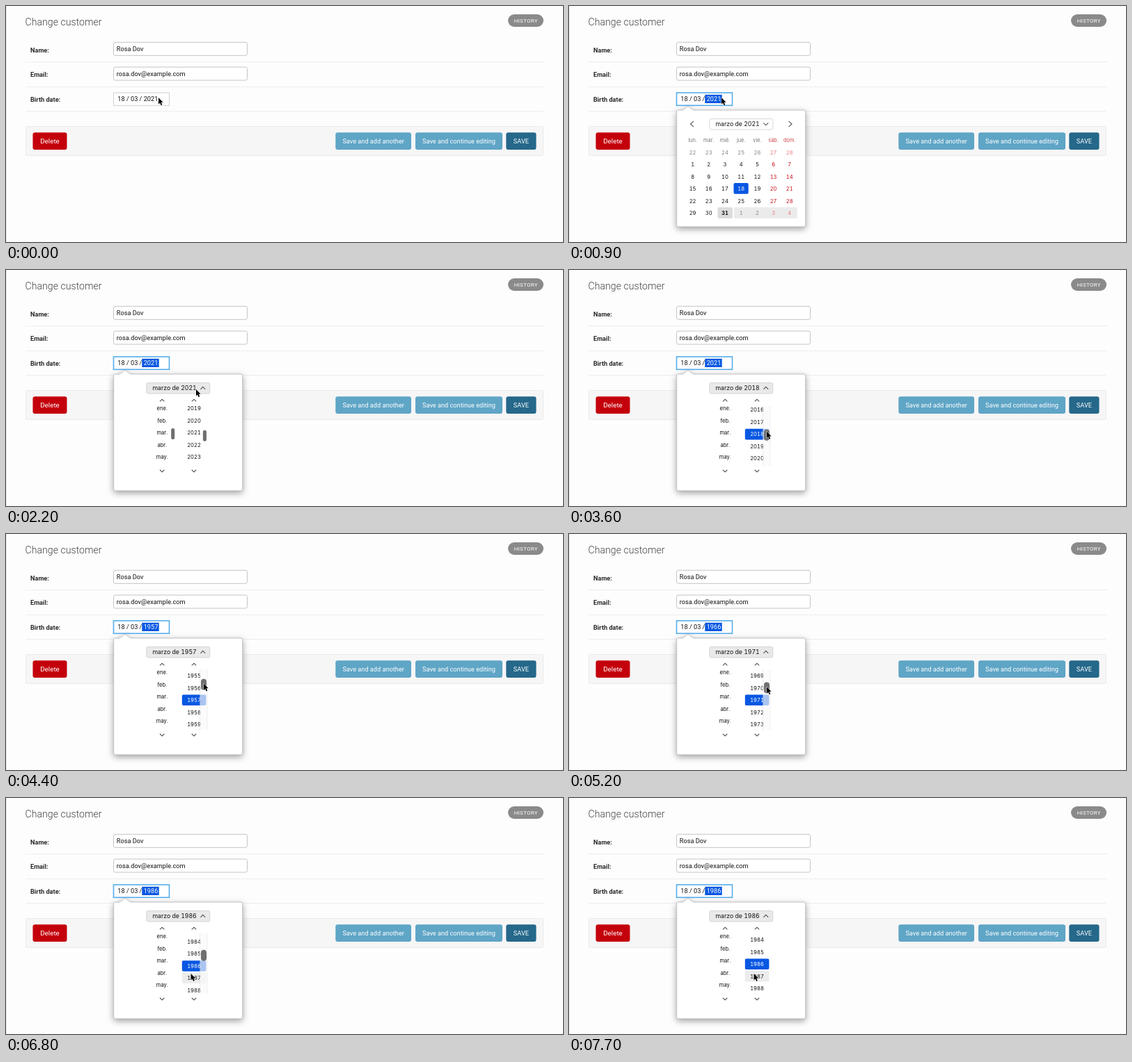
Write an HTML page that moves like this. It is 800 px wide and 340 px high and loops after 8 s.

```html
<!DOCTYPE html>
<html lang="en">
<head>
<meta charset="utf-8">
<title>Birth date picker</title>
<style>
html, body { margin: 0; width: 100%; height: 100%; overflow: hidden; background: #fefdfe; }
svg { display: block; width: 800px; height: 340px; }
text { font: 9.2px Roboto, sans-serif; fill: #111; }
.title { font-size: 14.15px; font-weight: 300; fill: #444; }
.label { font-weight: 700; fill: #2b2b2b; }
.light { fill: #fff; }
.pill { font-size: 7.8px; letter-spacing: .35px; }
.mid, .picker text { text-anchor: middle; }
.field { fill: #fff; stroke: #c4c4c4; }
.rule { stroke: #ededed; }
.picker text { font: 7.6px Inter, sans-serif; font-feature-settings: "tnum"; }
.picker .head { font-size: 8.7px; text-anchor: start; }
.picker .day { font-size: 7.4px; fill: #777; }
.frame { fill: #fff; stroke: #b5b5b5; stroke-width: .8; filter: drop-shadow(0 3px 5px rgba(0,0,0,.36)); }
.chev { fill: none; stroke: #555; stroke-width: 1.1; }
.blue { fill: #0757e2; }
.thumb { fill: #6f6f70; }
</style>
</head>
<body>
<svg viewBox="0 0 800 340">
  <path d="M.5 0V340" stroke="#e2e2e4"/>
  <text class="title" x="27.5" y="27.5">Change customer</text>
  <rect x="721" y="12" width="51" height="18" rx="9" fill="#8b8a8b"/>
  <text class="light pill mid" x="746.7" y="23.8">HISTORY</text>

  <path class="rule" d="M28 80.5H772M28 116.5H772M28 151.5H772"/>
  <text class="label" x="35" y="66.5">Name:</text>
  <text class="label" x="35" y="102">Email:</text>
  <text class="label" x="35" y="137.6">Birth date:</text>
  <rect class="field" x="154.5" y="52.3" width="192" height="19" rx="2.5"/>
  <rect class="field" x="154.5" y="88" width="192" height="19" rx="2.5"/>
  <text x="158.8" y="65">Rosa Dov</text>
  <text x="158.8" y="100.8">rosa.dov@example.com</text>

  <rect id="date" x="154.5" y="125" width="80" height="18.3" fill="#fff"/>
  <rect id="mark" class="blue" x="195.3" y="127.8" width="24.4" height="12.2"/>
  <text x="160.3" y="137.4">18 / 03 / <tspan id="value">2021</tspan></text>

  <rect x="28.5" y="173.5" width="743" height="42" rx="2" fill="#f7f6f7" stroke="#ebebeb"/>
  <g id="buttons"></g>

  <g id="picker" class="picker">
    <path class="frame" d="M156.7 150H163.5L171 144.2L178.5 150H337.7Q339.7 150 339.7 152V316Q339.7 318 337.7 318H156.7Q154.7 318 154.7 316V152Q154.7 150 156.7 150Z"/>
    <rect id="headBox" x="201.8" y="162.5" width="91" height="15.5" rx="2" stroke="#cfcfcf" stroke-width=".8"/>
    <text id="head" class="head" x="210.5" y="173.3"></text>
    <path id="headChev" class="chev"/>
    <g id="month">
      <path class="chev" d="M179 165.8L174.6 170L179 174.2M315.6 165.8L320 170L315.6 174.2"/>
    </g>
    <g id="spin">
      <path class="chev" d="M221 189.3L224.2 186.3L227.4 189.3M266.8 189.3L270 186.3L273.2 189.3M221 288L224.2 291L227.4 288M266.8 288L270 291L273.2 288"/>
      <clipPath id="clip"><rect x="205" y="195.5" width="90" height="87"/></clipPath>
      <g id="lists" clip-path="url(#clip)"></g>
      <rect id="monthThumb" class="thumb" x="237.2" y="228" width="5" height="16" rx="2.5"/>
      <g id="bar">
        <g id="track">
          <rect x="278.3" y="195.5" width="11" height="87" fill="#fafafa" fill-opacity=".68"/>
          <path d="M278.5 195.5V282.5M289 195.5V282.5" stroke="#000" stroke-opacity=".06"/>
        </g>
        <rect id="thumb" class="thumb" height="16"/>
      </g>
    </g>
  </g>
  <path id="cursor" d="M0 0V9.4L2.1 7.4L3.6 11L5.3 10.2L3.8 6.8H6.6Z" stroke="#fff" stroke-width="1" paint-order="stroke"/>
</svg>
<script>
const $ = id => document.getElementById(id);
const set = (el, attrs) => { for (const k in attrs) el.setAttribute(k, attrs[k]); return el; };
const add = (parent, tag, attrs, text = '') => {
  const el = set(document.createElementNS('http://www.w3.org/2000/svg', tag), attrs);
  el.textContent = text;
  return parent.appendChild(el);
};
const show = (id, on) => set($(id), { opacity: +on });

const LOOP = 8000, STEP = 100, PITCH = 17.5, MID = 239.2;

const button = (x, w, label, fill, size = 9.2) => {
  add($('buttons'), 'rect', { x, y: 182.3, width: w, height: 24.7, rx: 3, fill });
  add($('buttons'), 'text', { x: x + w / 2, y: 198, class: 'light mid', style: `font-size:${size}px` }, label);
};
button(38.5, 49, 'Delete', '#c4000c', 9.8);
button(473.3, 108.7, 'Save and add another', '#5fa5c6');
button(588, 125, 'Save and continue editing', '#5fa5c6');
button(718.3, 43.2, 'SAVE', '#25688a');

// calendar page
const box = (x, y, w, h, fill) => add($('month'), 'rect', { x, y, width: w, height: h, rx: 2, fill });
const colX = i => 177.6 + 23.2 * i;
box(236.8, 290, 91, 16, '#ebebeb');
box(213.5, 290, 21.5, 16, '#dcdcdc');
box(236.5, 255, 21.2, 15.7, '#0757e2');
['lun.', 'mar.', 'mié.', 'jue.', 'vie.', 'sáb.', 'dom.'].forEach((d, i) =>
  add($('month'), 'text', { x: colX(i), y: 195.7, class: 'day', style: i > 4 ? 'fill:#cf4a4a' : '' }, d));
for (let n = 0; n < 42; n++) {
  const day = n - 6, weekend = n % 7 > 4, inside = day > 0 && day < 32;
  const label = day < 1 ? day + 28 : day > 31 ? day - 31 : day;
  const fill = day === 18 ? '#fff' : weekend ? (inside ? '#cc0a14' : '#ee7b7e') : inside ? '#111' : '#858585';
  add($('month'), 'text', {
    x: colX(n % 7), y: 213.5 + PITCH * Math.floor(n / 7),
    style: `fill:${fill};font-weight:${day === 31 ? 700 : 400}`
  }, label);
}

// month and year lists
['ene.', 'feb.', 'mar.', 'abr.', 'may.'].forEach((m, i) =>
  add($('lists'), 'text', { x: 224.3, y: 202.4 + PITCH * i }, m));
const rows = Array.from({ length: 7 }, () => ({
  box: add($('lists'), 'rect', { x: 252.8, width: 34.6, height: 15.6, rx: 2 }),
  text: add($('lists'), 'text', { x: 270 })
}));

// tracks: [time, values...], eased between neighbours
const pointer = [
  [900, 219, 132], [1400, 242, 163], [1500, 243, 164], [2000, 272, 171], [2200, 273, 172],
  [2600, 273, 172], [3300, 284, 233.5], [3500, 284, 233.5], [4250, 284, 215.5],
  [4800, 284, 215.5], [5600, 284, 225], [5700, 284, 226], [5900, 277, 252], [6400, 265.5, 253]
];
const scroll = [
  [3500, 2021.27], [4250, 1957], [4800, 1957], [5600, 1985], [6500, 1985], [6900, 1986]
];
const at = (keys, t) => {
  const i = keys.findIndex(k => k[0] > t);
  if (i === 0) return keys[0].slice(1);
  if (i < 0) return keys[keys.length - 1].slice(1);
  const a = keys[i - 1], b = keys[i], p = (t - a[0]) / (b[0] - a[0]);
  const e = p * p * (3 - 2 * p);
  return a.slice(1).map((v, j) => v + (b[j + 1] - v) * e);
};
const clamp = v => Math.max(0, Math.min(1, v));

function draw(t) {
  const [x, y] = at(pointer, t), [pos] = at(scroll, t);
  const focus = t >= 700, open = t >= 2000, wide = t >= 3100;
  const year = Math.round(pos);

  set($('cursor'), { transform: `translate(${x} ${y})` });
  set($('date'), { stroke: focus ? '#55aeea' : '#d0d0d0', 'stroke-width': focus ? 1.6 : 1 });
  show('mark', focus);
  $('value').style.fill = focus ? '#fff' : '#111';
  $('value').textContent = Math.round(at(scroll, t - STEP)[0]);

  set($('picker'), { opacity: clamp((t - 700) / 200) });
  show('month', !open);
  show('spin', open);
  $('head').textContent = 'marzo de ' + year;
  set($('headBox'), { fill: open ? '#e9e9e9' : '#fff' });
  set($('headChev'), { d: open ? 'M279.4 171.8L282.8 168.4L286.2 171.8' : 'M279.4 168.4L282.8 171.8L286.2 168.4' });

  rows.forEach((row, i) => {
    const value = year + i - 3, cy = MID + (value - pos) * PITCH;
    const picked = value === year && t >= 3600;
    const hover = x < 279 && Math.abs(y - cy) < 8;
    set(row.box, { y: cy - 7.8, fill: picked ? '#0757e2' : hover ? '#ececec' : 'none' });
    set(row.text, { y: cy + 2.8 }).style.fill = picked ? '#fff' : '#111';
    row.text.textContent = value;
  });

  set($('monthThumb'), { opacity: 1 - clamp((t - 2500) / 400) });
  set($('bar'), { opacity: 1 - clamp((t - 7300) / 400) });
  show('track', wide);
  set($('thumb'), {
    x: wide ? 280 : 282.9, width: wide ? 8 : 5, rx: wide ? 4 : 2.5,
    y: 230.8 - (2021.27 - pos) * .343
  });
}

const start = performance.now();
function tick() {
  const t = (performance.now() - start) % LOOP;
  draw(Math.floor(t / STEP) * STEP);
  requestAnimationFrame(tick);
}
tick();
</script>
</body>
</html>
```
